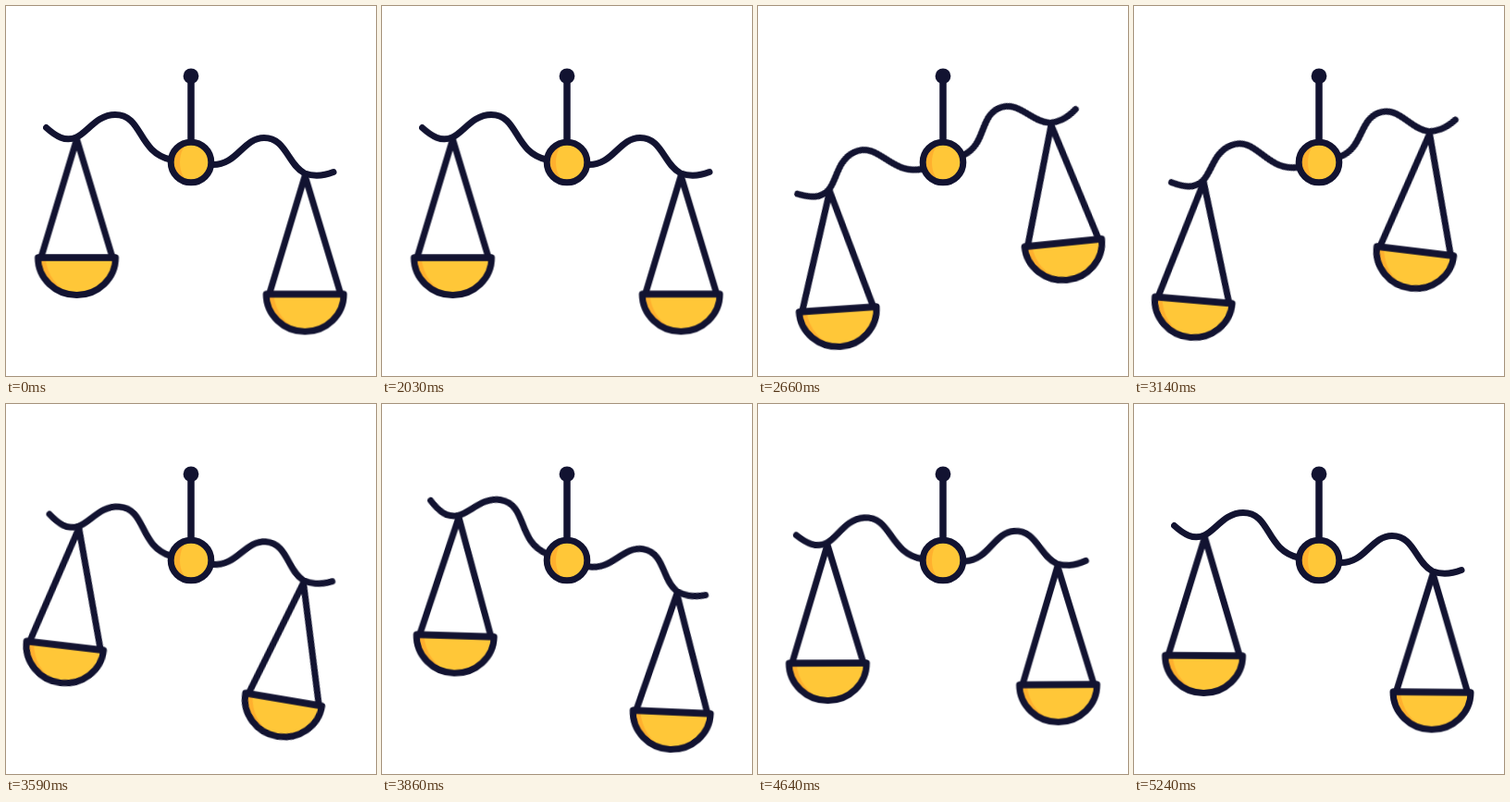
An HTML page for the animation above (5270 ms loop, 400 px wide and 400 px high).

```html
<!DOCTYPE html>
<html lang="en">
<head>
<meta charset="utf-8">
<title>Swinging scales</title>
<style>
  html, body { margin: 0; width: 100%; height: 100%; overflow: hidden; background: #fff; }
  svg { display: block; width: 100vw; height: 100vh; }
  .line { fill: none; stroke: #121331; stroke-width: 7; stroke-linecap: round; stroke-linejoin: round; }
  .dark { fill: #121331; }
  .gold { fill: #ffc738; }
  .shade { fill: #ffb02e; }
</style>
</head>
<body>
<svg viewBox="0 0 400 400">
  <defs>
    <g id="pan">
      <path class="shade" d="M-42 129A42 40.5 0 0 0 42 129Z"/>
      <path class="gold" d="M-34 129C-32 148 -22 162 -4 169.3A42 40.5 0 0 0 42 129Z"/>
      <path class="line" d="M-38 127L0 1L38 127"/>
      <path class="line" d="M-42 129A42 40.5 0 0 0 42 129Z"/>
      <path class="line" d="M-41.5 129H41.5" stroke-width="8"/>
    </g>
  </defs>

  <g transform="translate(200 169)">
    <g id="beam">
      <path class="line" d="M-156.5 -37.5C-146 -28 -136 -22 -124 -27C-112 -32 -102 -51.5 -82 -51.5C-52 -51.5 -58 -11 -22 -3"/>
      <path class="line" d="M22 2.5C50 4 56 -26.5 79 -26.5C103 -26.5 104 2 123 12C133 15.5 145 14 154 10.5"/>
      <g transform="translate(-123.5 -26)"><g class="level"><g id="left"><use href="#pan"/></g></g></g>
      <g transform="translate(123.2 13.5)"><g class="level"><g id="right"><use href="#pan"/></g></g></g>
    </g>
  </g>

  <path class="line" d="M200 76V147" style="stroke-width:7.5"/>
  <circle class="dark" cx="200" cy="75.8" r="8.4"/>
  <circle class="shade" cx="200" cy="169" r="22"/>
  <path class="gold" d="M200 147A22 22 0 0 1 200 191C184 187 184 151 200 147Z"/>
  <circle class="line" cx="200" cy="169" r="21.8"/>
</svg>
<script>
const LOOP = 5270, START = 2030, STEP = 30;
const soft = 'cubic-bezier(.4,0,.6,1)';
const even = 'cubic-bezier(.25,0,.75,1)';
const round = 'cubic-bezier(.33,0,.67,1)';

// [time in ms, degrees, easing towards the next step]
const tilt = [
  [2015, 0, 'cubic-bezier(.3,0,.55,1)'], [2850, -28.2, soft],
  [3850, 10.2, soft], [4470, -4.2, soft], [5240, 0, 'linear']
];
const swing = (a, b, c, d, rest) => [
  [2015, 0, soft], [2390, a, even], [3420, b, round],
  [4230, c, round], [4880, d, round], [5250, rest, 'linear']
];

const anims = [];
function turn(el, steps, sign = 1) {
  const all = [[0, 0, 'linear'], ...steps, [LOOP, steps.at(-1)[1], 'linear']];
  const frames = all.map(([time, deg, easing]) =>
    ({ offset: time / LOOP, transform: `rotate(${deg * sign}deg)`, easing }));
  const anim = el.animate(frames, { duration: LOOP, fill: 'both' });
  anim.pause();
  anims.push(anim);
}

const $ = id => document.getElementById(id);
turn($('beam'), tilt);
document.querySelectorAll('.level').forEach(el => turn(el, tilt, -1));
turn($('left'), swing(-6.8, 8, -3.2, 1.2, 0.4));
turn($('right'), swing(-10, 11.4, -4.4, 1.5, 0.5));

const begin = performance.now();
function draw() {
  const t = (performance.now() - begin) % LOOP;
  const held = t < START ? 0 : START + Math.floor((t - START) / STEP) * STEP;
  anims.forEach(a => { a.currentTime = held; });
  requestAnimationFrame(draw);
}
draw();
</script>
</body>
</html>
```
